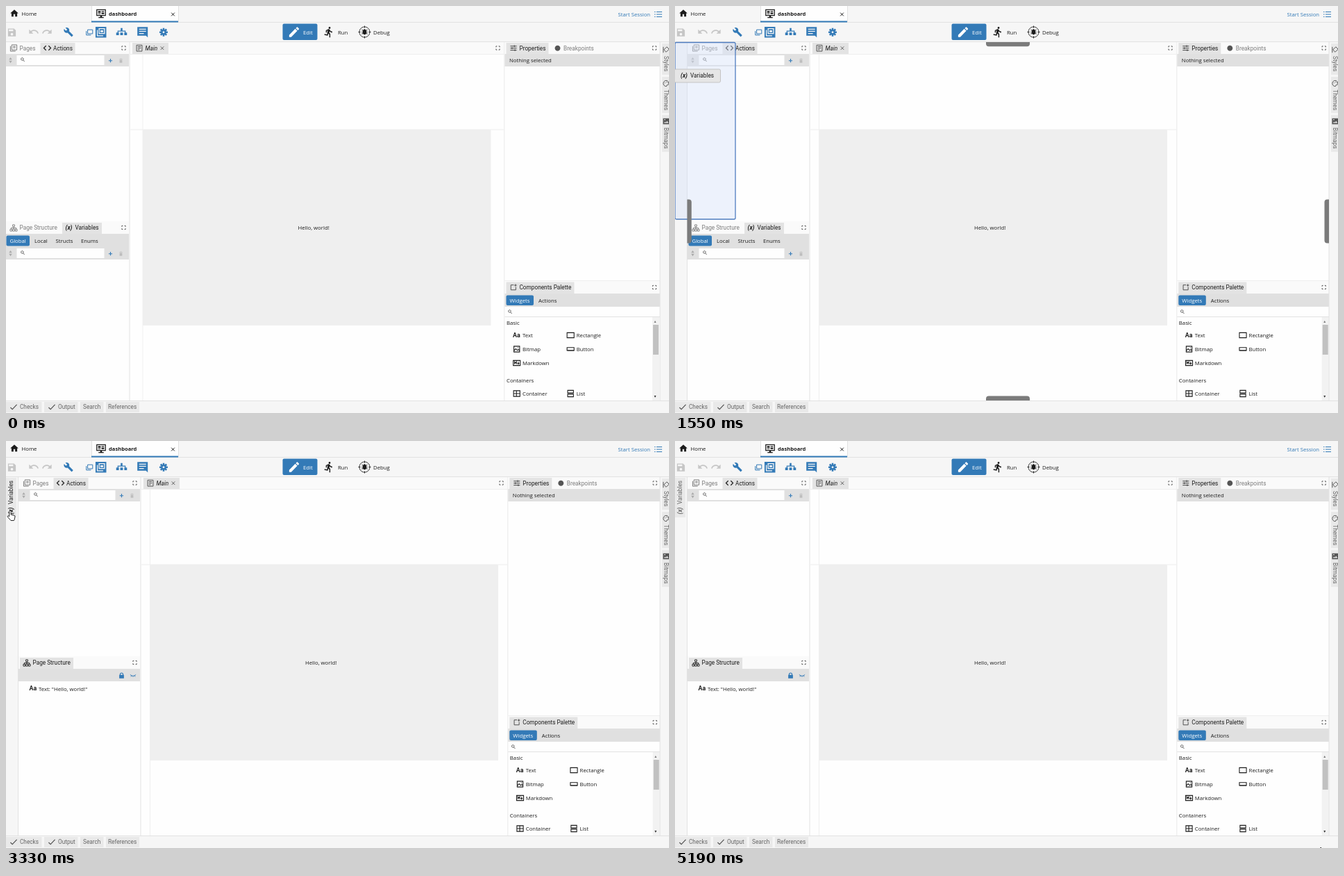
An HTML page with a canvas that plays this animation: 955 by 586 pixels, repeating every 5270 ms.

```html
<!DOCTYPE html>
<html lang="en">
<head>
<meta charset="utf-8">
<title>Docking a panel</title>
<style>
html, body { margin: 0; width: 100%; height: 100%; overflow: hidden; background: #fefefe; }
canvas { display: block; width: 955px; height: 586px; }
</style>
</head>
<body>
<canvas id="stage"></canvas>
<script>
const LOOP = 5270, W = 955, H = 586;
const BLUE = '#337ab7', DARK = '#1c1c1c', GREY = '#7d7d7d', PALE = '#bdbdbd';
const BAR = '#e0e0e0', TAB = '#e3e3e3', STRIP = '#f6f6f6', LINE = '#e2e2e2', PAPER = '#fefefe';
const UI = '7.75px "Open Sans", sans-serif', LABEL = '8.25px Roboto, sans-serif';

const canvas = document.getElementById('stage');
const ctx = canvas.getContext('2d');
const dpr = window.devicePixelRatio || 1;
canvas.width = W * dpr;
canvas.height = H * dpr;

// Icons on a 24 unit grid
const gearTeeth = Array.from({ length: 8 }, (_, i) => {
  const c = Math.cos(i * Math.PI / 4), s = Math.sin(i * Math.PI / 4);
  return `M${12 + 7 * c} ${12 + 7 * s}L${12 + 11 * c} ${12 + 11 * s}`;
}).join('');
const ICON = {
  home: 'M10 20v-6h4v6h5v-8h3L12 3 2 12h3v8z',
  screen: 'M1 2h22v15h-9v3h4v2H6v-2h4v-3H1zM3 4v11h18V4zM5 6h6v4H5zM13 6h6v2h-6zM13 9.500h6V13h-6zM5 11.500h6V13H5z',
  list: 'M1 5h3M7 5h16M1 12h3M7 12h16M1 19h3M7 19h16',
  save: 'M17 3H3v18h18V7zM12 19a3 3 0 1 1 0-6 3 3 0 0 1 0 6zM15 9H5V5h10z',
  undo: 'M12.500 8c-2.650 0-5 1-6.900 2.600L2 7v9h9l-3.600-3.600c1.400-1.200 3.200-1.900 5.100-1.900 3.500 0 6.500 2.300 7.600 5.500l2.400-.8C21 11 17.100 8 12.500 8z',
  wrench: 'M22.700 19l-9.100-9.100c.9-2.300.4-5-1.500-6.900-2-2-5-2.400-7.400-1.300L9 6 6 9 1.600 4.700C.4 7.100.9 10.100 2.900 12.100c1.900 1.900 4.600 2.400 6.900 1.500l9.100 9.100c.4.4 1 .4 1.400 0l2.300-2.300c.5-.4.5-1.100.1-1.400z',
  layers: 'M7 4h15v12H7zM3 8v12h14',
  frames: 'M0 0h24v24H0zM7 3v13h14V3zM9 5h10v9H9zM3 7v14h14v-2H5V7zM11 8h6v4h-6z',
  tree: 'M10 3h4v6h7v4h3v6h-6v-6h1v-2H5v2h1v6H0v-6h3V9h7zM9 13h6v6H9z',
  note: 'M0 0h24v24l-4-4H0zM4 4v2h16V4zM4 9v2h16V9zM4 14v2h11v-2z',
  gear: 'M12 7a5 5 0 1 0 .01 0' + gearTeeth,
  pencil: 'M3 17.250V21h3.750L17.800 9.900l-3.750-3.750zM20.700 7a1 1 0 0 0 0-1.400l-2.300-2.300a1 1 0 0 0-1.400 0l-1.900 1.800 3.750 3.750z',
  run: 'M13.500 5.500a2 2 0 1 0 0-4 2 2 0 0 0 0 4zM9.900 19.400l1-4.400 2.100 2v6h2v-7.500l-2.100-2 .6-3c1.300 1.500 3.300 2.500 5.500 2.500v-2c-1.900 0-3.500-1-4.300-2.400l-1-1.600c-.7-1-1.500-1.200-2.500-.9L6 8.300V13h2V9.600l1.800-.7-1.600 8.100-4.900-1-.4 2z',
  target: 'M12 2a10 10 0 1 0 .01 0M12 0v4M12 20v4M0 12h4M20 12h4',
  bug: 'M9 8a3 3 0 0 1 6 0l3-2 .6 1L16 9v2h3v1.200h-3V14l3 2-.6 1-3-1.500a3.500 3.500 0 0 1-6.800 0L5.600 17 5 16l3-2v-1.800H5V11h3V9L5.400 7 6 6z',
  pages: 'M6 2h16v16H6zM2 6v16h16M10 7h8M10 11h8',
  code: 'M8 5l-7 7 7 7M16 5l7 7-7 7',
  expand: 'M3 8V3h5M16 3h5v5M21 16v5h-5M8 21H3v-5',
  sort: 'M12 1l6 9H6zM12 23l6-9H6z',
  search: 'M10 3a6 6 0 1 0 .01 0M14.500 14.500L21 21',
  plus: 'M12 3v18M3 12h18',
  cross: 'M4 4l16 16M20 4L4 20',
  trash: 'M4 4h5l1-2h4l1 2h5v2H4zM6 8h12v14H6z',
  sheet: 'M3 2h18v20H3zM7 7h10M7 12h10M7 17h6',
  nodes: 'M9 2h6v6H9zM1 16h6v6H1zM9 16h6v6H9zM17 16h6v6h-6zM12 8v8M4 16v-4h16v4',
  sliders: 'M1 5h22M1 12h22M1 19h22M15 2v6M7 9v6M17 16v6',
  dot: 'M12 2a10 10 0 1 0 .01 0',
  addBox: 'M13 4H3v17h17V11M19 1v8M15 5h8',
  check: 'M2 13l6 6L22 4',
  picture: 'M3 3h18v18H3zM3 17l6-6 5 5 3-3 4 4M15 8h2',
  rect: 'M1 4h22v16H1z',
  button: 'M1 7h22v9H1zM2 17h21',
  mark: 'M1 4h22v16H1zM5 16V8l3 4 3-4v8M17 8v7M14 13l3 3 3-3',
  grid: 'M2 3h20v18H2zM11 3v18M2 12h20',
  rows: 'M3 2h18v8H3zM3 14h18v8H3z',
  lock: 'M5 10V8a7 7 0 0 1 14 0v2h2v13H3V10zM8 10h8V8a4 4 0 0 0-8 0z',
  lid: 'M1 9q11 10 22 0M6 13l-2 4M12 14v4M18 13l2 4',
  brush: 'M14 2L4 12l8 8 10-10zM2 2v20',
  palette: 'M12 2a10 10 0 1 0 0 20c3 0 1-4 3-5h4c5-3 1-15-7-15zM7 10h2M12 7h2M16 10h2',
  image: 'M1 2h22v20H1zM4 18h16l-5-7-4 5-3-3zM5 5v3h4V5z'
};

function icon(name, x, y, size, color, stroke) {
  ctx.save();
  ctx.translate(x - size / 2, y - size / 2);
  ctx.scale(size / 24, size / 24);
  const path = new Path2D(ICON[name]);
  if (stroke) {
    ctx.strokeStyle = color;
    ctx.lineWidth = stroke * 24 / size;
    ctx.stroke(path);
  } else {
    ctx.fillStyle = color;
    ctx.fill(path, 'evenodd');
  }
  ctx.restore();
}
function box(x, y, right, bottom, fill, radius = 0, border, lineWidth = 1) {
  ctx.beginPath();
  ctx.roundRect(x, y, right - x, bottom - y, radius);
  if (fill) { ctx.fillStyle = fill; ctx.fill(); }
  if (border) { ctx.strokeStyle = border; ctx.lineWidth = lineWidth; ctx.stroke(); }
}
function text(s, x, y, color = DARK, font = UI) {
  ctx.font = font;
  ctx.fillStyle = color;
  ctx.fillText(s, x, y + 2.8);
}
const label = (s, x, y, color = DARK) => text(s, x, y, color, LABEL);
const variableIcon = (x, y, color = DARK) => text('(x)', x, y, color, 'italic bold 8.5px Roboto, sans-serif');
const letters = (x, y) => text('Aa', x, y, DARK, 'bold 8.8px Roboto, sans-serif');
function turned(x, y, angle, draw) {
  ctx.save();
  ctx.translate(x, y);
  ctx.rotate(angle);
  draw();
  ctx.restore();
}

function header() {
  box(0, 0, W, 52, STRIP);
  box(0, 23, W, 24, LINE);
  box(0, 51, W, 52, LINE);
  box(123, 0, 248, 23, PAPER);
  box(123, 0, 124, 23, LINE);
  box(248, 0, 249, 23, LINE);
  box(123, 21.5, 248, 23.5, BLUE);
  icon('home', 12, 10.5, 14, DARK);
  text('Home', 22.5, 11);
  icon('screen', 137, 11, 15, DARK);
  text('dashboard', 148, 11, DARK, 'bold 7.6px "Open Sans", sans-serif');
  icon('cross', 240.5, 12, 7, DARK, 1);
  text('Start Session', 881.5, 12, BLUE);
  icon('list', 939.5, 12, 12, BLUE, 1.2);

  icon('save', 8.5, 38, 15, '#c6c6c6');
  icon('undo', 40, 37, 16, '#c6c6c6');
  ctx.save();
  ctx.scale(-1, 1);
  icon('undo', -59, 37, 16, '#c6c6c6');
  ctx.restore();
  icon('wrench', 90, 37.5, 14.5, BLUE);
  icon('layers', 120, 38, 11.5, BLUE, 1);
  icon('frames', 136.7, 37.7, 15.5, BLUE);
  icon('tree', 166.5, 37.5, 15.5, BLUE);
  icon('note', 196.7, 37.7, 15, BLUE);
  icon('gear', 227, 37.7, 13, BLUE, 2.6);
  box(398.5, 25.5, 448.5, 49, BLUE, 2);
  icon('pencil', 415, 37.5, 19, '#fff');
  text('Edit', 428, 38, '#fff');
  icon('run', 465, 37.5, 17, DARK);
  text('Run', 478, 38);
  icon('target', 516.5, 37.5, 18, DARK, 0.9);
  icon('bug', 516.5, 37.5, 15, DARK);
  text('Debug', 529, 38);
}

function searchBar(y, left, right) {
  icon('sort', 6.5 + left, y, 9, '#aaa');
  box(15.5 + left, y - 7, 141.5 + right, y + 7, PAPER);
  icon('search', 24 + left, y - 0.7, 7, '#444', 0.9);
  icon('plus', 150.5 + right, y + 0.7, 7, BLUE, 1.1);
  icon('trash', 165.5 + right, y + 0.7, 7.5, PALE);
}

function leftPanels(border, docked) {
  const a = border ? 19 : 0, b = border ? 16 : 0;
  const x = border ? 18 : 0, end = 177 + b;
  box(x, 52, end, 69, '#fafafa');
  box(49.5 + a, 53, 99.5 + a, 69, TAB);
  icon('pages', 11 + a, 60.5, 11, GREY, 1);
  label('Pages', 19.5 + a, 61, GREY);
  icon('code', 59.5 + a, 60.5, 11, DARK, 1.2);
  label('Actions', 68 + a, 61);
  icon('expand', 169.5 + b, 60.5, 7, '#444', 0.9);
  box(x, 69, end, 87, BAR);
  searchBar(78, a, b);

  box(x, 310, end, 328, '#fafafa');
  icon('expand', 169.5 + b, 319, 7, '#444', 0.9);
  box(x, 328, end, docked ? 346 : 365, BAR);
  if (docked) {
    box(20, 312, 97, 328, TAB);
    icon('lock', 166.5, 337.5, 9, BLUE);
    icon('lid', 183, 337.5, 9, BLUE, 0.9);
    letters(33.5, 356.5);
    text('Text: "Hello, world!"', 47, 357);
  } else {
    box(81 + a, 312, 138 + a, 328, TAB);
    variableIcon(85.5 + a, 319.5);
    label('Variables', 99.5 + a, 319.5);
    box(0.5 + a, 330.5, 34 + a, 345.5, BLUE, 2);
    text('Global', 5.5 + a, 338, '#fff');
    text('Local', 41 + a, 338);
    text('Structs', 71.5 + a, 338);
    text('Enums', 108 + a, 338);
    searchBar(356, a, b);
  }
  const color = docked ? DARK : GREY;
  icon('nodes', 11 + a, 319.5, 11, color, 0.9);
  label('Page Structure', 19.5 + a, 319.5, color);
  box(end, 52, end + 2, 568, '#f0f0f0');
}

function mainPanel(border) {
  const left = border ? 16 : 0, mid = border ? 10.5 : 0, right = border ? 5 : 0;
  box(179 + left, 52, 717 + right, 69, '#fafafa');
  box(179 + left, 69, 717 + right, 70, '#eee');
  box(182 + left, 53, 234 + left, 69, TAB);
  icon('sheet', 192 + left, 60.7, 10.5, '#555', 1);
  text('Main', 200.5 + left, 61, DARK, 'italic ' + LABEL);
  icon('cross', 225 + left, 60.7, 7, '#555', 0.9);
  icon('expand', 708.5 + right, 60.5, 7, '#444', 0.9);
  box(196.5 + mid, 70, 197.5 + mid, 568, '#efefef');
  box(179 + left, 177.5, 717 + right, 178.5, '#efefef');
  box(197 + mid, 178, 698.5 + mid, 460, '#efefef');
  text('Hello, world!', 420.5 + mid, 319);
  box(717 + right, 52, 718.5 + right, 568, '#f0f0f0');
}

function rightPanels(border) {
  const r = border ? 4.8 : 0, e = border ? 0.7 : 0, x = 718.5 + r;
  box(x, 52, 942, 69, '#fafafa');
  box(720.5 + r, 53, 781.5 + r, 69, TAB);
  icon('sliders', 731 + r, 60.7, 10, '#333', 0.9);
  label('Properties', 739.5 + r, 61);
  icon('dot', 794.5 + r, 60.7, 9.5, '#555');
  label('Breakpoints', 803 + r, 61, GREY);
  icon('expand', 934 + e, 60.5, 7, '#444', 0.9);
  box(x, 69, 942, 87, BAR);
  text('Nothing selected', 725 + r, 78);

  box(x, 395, 942, 396, '#eee');
  box(x, 396, 942, 414, '#fafafa');
  box(720.5 + r, 397.5, 818.5 + r, 414, TAB);
  icon('addBox', 731 + r, 405, 10, '#444', 0.9);
  label('Components Palette', 739.5 + r, 405.5);
  icon('expand', 934 + e, 405, 7, '#444', 0.9);
  box(x, 414, 942, 433, BAR);
  box(720.5 + r, 416.5, 760 + r, 431, BLUE, 2);
  text('Widgets', 725.5 + r, 424, '#fff');
  text('Actions', 767 + r, 424);
  icon('search', 726 + r, 440.3, 7, '#444', 0.9);
  box(x, 447, 942, 448, LINE);

  text('Basic', 721 + r, 456);
  letters(730 + r, 474);
  text('Text', 744 + r, 474);
  text('Containers', 721 + r, 539);
  const items = [
    ['rect', 'Rectangle', 1, 474], ['picture', 'Bitmap', 0, 494], ['button', 'Button', 1, 494],
    ['mark', 'Markdown', 0, 514], ['grid', 'Container', 0, 558], ['rows', 'List', 1, 558]
  ];
  for (const [name, caption, column, y] of items) {
    icon(name, 735.7 + column * 77.5 + r, y, 11, DARK, 1.1);
    text(caption, 744 + column * 77.8 + r, y);
  }
  box(931 + e, 448, 941 + e, 568, '#f2f2f2');
  box(932 + e, 459, 940 + e, 502, '#c1c1c1');
  text('▴', 933.5 + e, 453.5, '#777', '6px "DejaVu Sans", sans-serif');
  text('▾', 933.5 + e, 561, '#333', '6px "DejaVu Sans", sans-serif');
}

function borders(border, docked, hover) {
  box(942, 52, W, 568, STRIP);
  box(941.5, 52, 942.5, 568, LINE);
  const tabs = [['brush', 'Styles', 54, 99, 72], ['palette', 'Themes', 102, 154, 120.5], ['image', 'Bitmaps', 157, 210, 175]];
  for (const [name, caption, top, bottom, start] of tabs) {
    box(945, top, W, bottom, '#e9e9e9');
    icon(name, 951, start - 9, 10, '#555', name === 'image' ? 0 : 1);
    turned(951, start, Math.PI / 2, () => label(caption, 0, 0, '#666'));
  }
  if (border) {
    box(0, 52, 17.5, 568, STRIP);
    box(17, 52, 18, 568, LINE);
  }
  if (docked) {
    const color = hover ? DARK : '#666';
    box(0, 53, 15, 110, '#e9e9e9');
    turned(7.5, 105.5, -Math.PI / 2, () => {
      variableIcon(0, 0, color);
      label('Variables', 14.5, 0, color);
    });
  }
  box(0, 568, W, H, STRIP);
  box(0, 568, W, 569, LINE);
  for (const [caption, left, right, x] of [['Checks', 0, 51.5, 20], ['Output', 55, 103.5, 75], ['Search', 107, 140.5, 111], ['References', 144, 192, 147]]) {
    box(left, 570, right, 585, '#e9e9e9');
    if (x - left > 10) icon('check', x - 9, 577.5, 11, '#555', 1.2);
    label(caption, x, 577.5, '#666');
  }
}

// Keys: time, easing power of the segment ending there, values.
const MOUSE = [
  [200, 1, 822, 563], [680, 0.6, 105, 326], [810, 1, 105, 326], [1280, 0.8, -8, 175],
  [1550, 1, -8, 95], [1840, 1, -8, 86], [1980, 1, -8, 73], [2180, 1, -8, 73],
  [2530, 1, 1, 96], [2670, 1, 4, 99], [3330, 1, 6, 100], [3820, 2, 82, 211],
  [4380, 2, 499, 441], [4450, 1, 617, 477], [4860, 0.7, 915, 590], [5189, 1, 915, 590], [5190, 1, 930, 585]
];
const OUTLINE = [
  [810, 1, 82, 311, 56, 18], [1210, 1, 47, 311, 103, 15], [1280, 1, 33, 232, 98, 88],
  [1350, 1, 12, 117, 91, 195], [1420, 1, 2, 65, 88, 243], [1480, 1, 0, 52.5, 87, 254.5],
  [2460, 1, 0, 52.5, 87, 254.5], [2530, 1, 0, 52.5, 69.5, 198], [2600, 1, 0, 52.5, 34, 84],
  [2670, 1, 0, 52.5, 19, 29], [2740, 1, 0, 52.5, 18, 21], [2800, 1, 0, 52.5, 17.5, 18]
];
const STEP = 69;

function sample(keys, t) {
  const next = keys.findIndex(k => k[0] > t);
  if (next < 0) return keys[keys.length - 1].slice(2);
  if (next === 0) return keys[0].slice(2);
  const from = keys[next - 1], to = keys[next], span = to[0] - from[0];
  const steps = Math.max(1, Math.round(span / STEP));
  const p = (Math.floor((t - from[0]) / span * steps) / steps) ** to[1];
  return from.slice(2).map((v, i) => v + (to[i + 2] - v) * p);
}

const ARROW = new Path2D('M0 0V10L2.300 7.900 4 11.600 5.500 11 3.900 7.400H7Z');
const HAND = new Path2D('M0 0Q1.200 0 1.200 1.200V6L6 7.200Q7.200 7.600 7 9L6 13.500Q5.800 14.500 5 14.500H1L-3.500 9.500Q-4.300 8.300-3 7.700L-1.200 8.500V1.200Q-1.200 0 0 0Z');
const MOVE = new Path2D('M0-6L2.500-3H1V-1H3V-2.500L6 0 3 2.500V1H1V3H2.500L0 6-2.500 3H-1V1H-3V2.500L-6 0-3-2.500V-1H-1V-3H-2.500Z');

function cursor(shape, x, y, fill, stroke) {
  ctx.save();
  ctx.translate(x, y);
  ctx.lineWidth = 0.9;
  ctx.fillStyle = fill;
  ctx.strokeStyle = stroke;
  ctx.fill(shape);
  ctx.stroke(shape);
  ctx.restore();
}

function dragLayer(t, mx, my, border) {
  const [x, y, w, h] = sample(OUTLINE, t);
  box(x, y, x + w, y + h, 'rgba(216,227,248,.45)', 2, '#4f7dc0', 1.3);
  const center = border ? 479.5 : 470, handle = '#7b7b7b';
  box(center - 31.5, 52, center + 31.5, 58.3, handle, [0, 0, 4, 4]);
  box(center - 31.5, 561.5, center + 31.5, 568, handle, [4, 4, 0, 0]);
  box(935.5, 278.5, 942, 341.5, handle, [4, 0, 0, 4]);
  const left = border ? 17.5 : -2;
  box(left, 278.5, left + 6.3, 341.5, handle, [0, 4, 4, 0]);

  const lx = Math.max(-1, mx - 19), ly = my - 4;
  box(lx, ly, lx + 66.5, ly + 19, '#e6e6e6', 2, '#c4c4c4');
  variableIcon(lx + 9, ly + 9.5);
  label('Variables', lx + 23, ly + 9.5);
}

function draw(t) {
  ctx.setTransform(dpr, 0, 0, dpr, 0, 0);
  box(0, 0, W, H, PAPER);
  const dragging = t >= 810 && t < 3330, border = t >= 1350, docked = t >= 3330;
  const [mx, my] = sample(MOUSE, t);
  const overDock = docked && mx < 17 && my < 110;
  const overTab = t < 810 && mx < 138 && my < 328;

  header();
  leftPanels(border, docked);
  mainPanel(border);
  rightPanels(border);
  borders(border, docked, overDock);
  if (dragging) dragLayer(t, mx, my, border);
  if (t < 200) return;
  if (dragging) cursor(MOVE, mx, my, '#f3e52c', '#8a8420');
  else cursor(overDock || overTab ? HAND : ARROW, mx, my, '#fff', '#111');
}

function tick() {
  draw(performance.now() % LOOP);
  requestAnimationFrame(tick);
}
tick();
</script>
</body>
</html>
```
